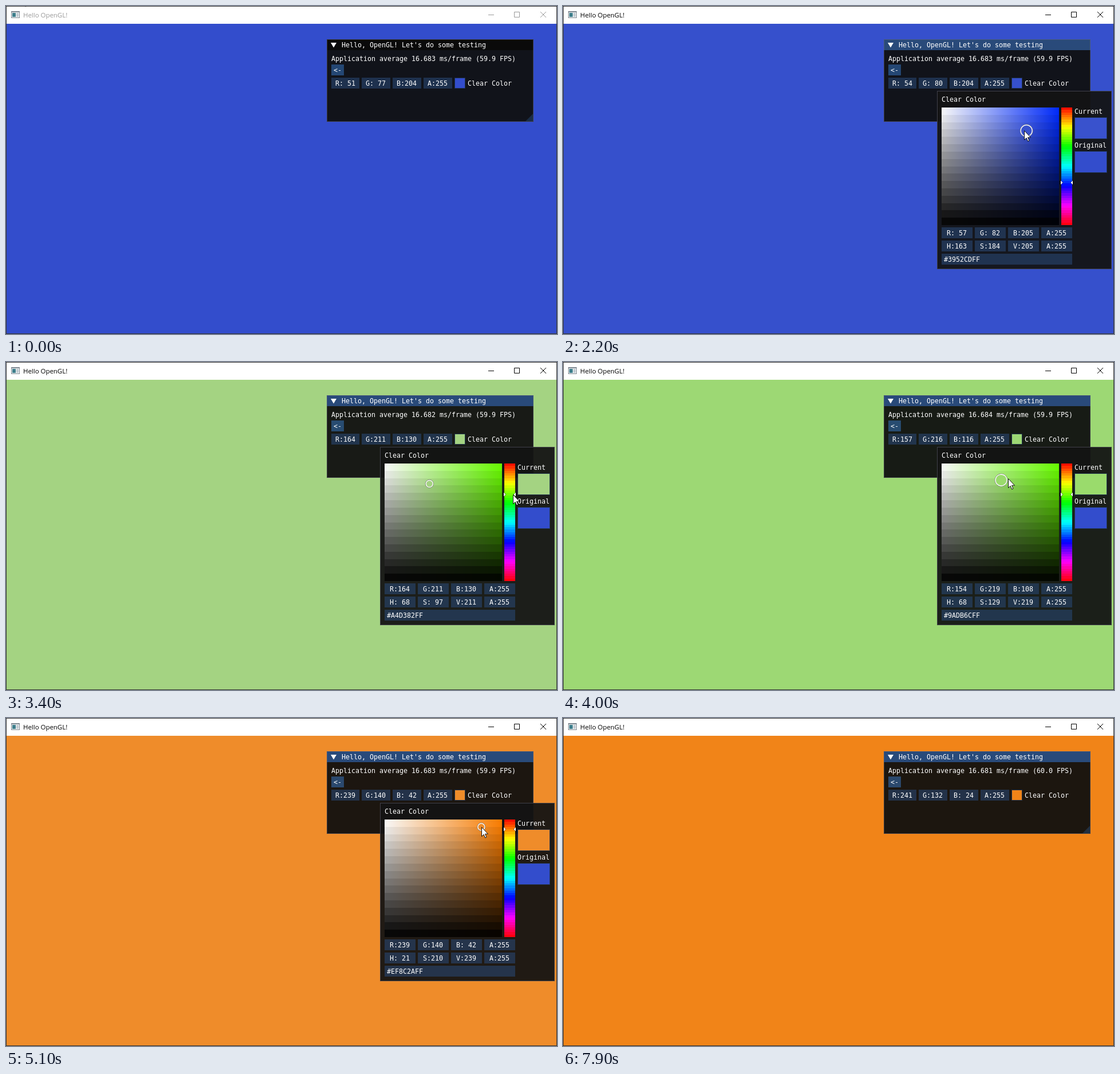
An HTML page for the animation above (8000 ms loop, 962x572 px).

```html
<!DOCTYPE html>
<html lang="en">
<head>
<meta charset="utf-8">
<title>Hello OpenGL!</title>
<style>
  html, body { margin: 0; width: 100%; height: 100%; overflow: hidden; background: #fff; }
  svg { display: block; width: 962px; height: 572px; }
  rect { shape-rendering: crispEdges; }
  text { white-space: pre; fill: #fff; font: 11.63px "DejaVu Sans Mono", "Liberation Mono", monospace; }
  #caption { font: 11.45px "Open Sans", "Noto Sans", sans-serif; }
  .field { fill: rgba(41, 74, 122, .54); }
  .edge { fill: none; stroke: rgba(110, 110, 128, .5); }
</style>
</head>
<body>
<svg id="stage" viewBox="0 0 962 572">
  <linearGradient id="sat">
    <stop offset="0" stop-color="#fff"/>
    <stop id="pure" offset="1"/>
  </linearGradient>

  <rect width="962" height="572" fill="#333"/>
  <rect x="1" y="1" width="960" height="30" fill="#fff"/>
  <g id="icon">
    <rect x="9" y="9" width="15" height="12" fill="#7d8790"/>
    <rect x="10" y="11" width="13" height="9" fill="#f4f6f7"/>
    <rect x="11" y="12" width="6" height="7" fill="#3f7f8c"/>
    <rect x="18" y="12" width="4" height="7" fill="#c3ccd2"/>
  </g>
  <text id="caption" x="30" y="20">Hello OpenGL!</text>
  <path id="controls" fill="none" d="M842 15.5h10M887.5 10.5h9v9h-9zM933 10l10 10M943 10l-10 10"/>
  <rect id="backdrop" x="1" y="31" width="960" height="540"/>

  <g id="panel">
    <rect x="560" y="58" width="361" height="144" fill="#0f0f0f" fill-opacity=".94"/>
    <rect id="bar" x="560" y="58" width="361" height="19"/>
    <path fill="rgba(66,150,250,.2)" d="M920 188v13h-13z"/>
    <rect class="edge" x="560.5" y="58.5" width="360" height="143"/>
    <path fill="#fff" d="M567 64h10l-5 8.5z"/>
    <text x="586" y="72">Hello, OpenGL! Let's do some testing</text>
    <text id="stats" x="568" y="96"></text>
    <rect x="568" y="102" width="22" height="19" fill="rgba(66,150,250,.4)"/>
    <text x="572" y="116">&lt;-</text>
    <text x="806" y="139">Clear Color</text>
  </g>

  <g id="popup">
    <rect x="653" y="148" width="305" height="311" fill="#141414" fill-opacity=".94"/>
    <rect class="edge" x="653.5" y="148.5" width="304" height="310"/>
    <text x="661" y="167">Clear Color</text>
    <rect x="661" y="177" width="205" height="205" fill="url(#sat)"/>
    <g id="shades"></g>
    <g id="hues"></g>
    <g id="pointers">
      <path d="M868 -4.5l5 4.5l-5 4.5zM891 -4.5l-5 4.5l5 4.5z"/>
      <path fill="#fff" d="M869 -3.5l3.5 3.5l-3.5 3.5zM890 -3.5l-3.5 3.5l3.5 3.5z"/>
    </g>
    <circle id="halo" fill="none" stroke="#808080"/>
    <circle id="ring" stroke="#fff" stroke-width="1.3"/>
    <text x="893" y="188">Current</text>
    <text x="893" y="247">Original</text>
    <rect class="field" x="661" y="432" width="228" height="19"/>
    <text id="hex" x="665" y="446"></text>
  </g>

  <path id="cursor" fill="#fff" stroke="#000" stroke-width=".9" d="M.5 .5v16l3.6-3.4 2.6 5.8 2.3-1-2.5-5.7h5z"/>
</svg>
<script>
const $ = id => document.getElementById(id);

function set(el, attrs) {
  for (const key in attrs) el.setAttribute(key, attrs[key]);
  return el;
}

function add(parent, tag, attrs) {
  return parent.appendChild(set(document.createElementNS("http://www.w3.org/2000/svg", tag), attrs));
}

function addSwatch(parent, x, y, width, height) {
  add(parent, "rect", { class: "field", x, y, width, height });
  return add(parent, "rect", { x: x + 1, y: y + 1, width: width - 2, height: height - 2 });
}

// Four value boxes that share a width; returns their text elements
function addFields(parent, x, y, total) {
  const size = (total - 12) / 4;
  return [0, 1, 2, 3].map(i => {
    const start = x + i * (size + 4), left = Math.floor(start);
    const width = Math.floor(start + size) - left;
    add(parent, "rect", { class: "field", x: left, y, width, height: 19 });
    return add(parent, "text", { x: left + Math.floor((width - 35) / 2), y: y + 14 });
  });
}

// Picker field: left, top and side length
const LEFT = 661, TOP = 177, SIDE = 205;

function addBands(parent, count, x, width, style) {
  const edge = i => TOP + Math.round(SIDE * i / count);
  for (let i = 0; i < count; i++)
    add(parent, "rect", { x, width, y: edge(i), height: edge(i + 1) - edge(i), ...style((i + .5) / count) });
}

addBands($("shades"), 16, LEFT, SIDE, u => ({ "fill-opacity": u }));
addBands($("hues"), 48, 870, 19, u => ({ fill: `hsl(${u * 360},100%,50%)` }));

const panelFields = addFields($("panel"), 568, 125, 211);
const rgbFields = addFields($("popup"), LEFT, 386, 228);
const hsvFields = addFields($("popup"), LEFT, 409, 228);
const panelSwatch = addSwatch($("panel"), 783, 125, 19, 19);
const currentSwatch = addSwatch($("popup"), 893, 194, 57, 38);
const originalSwatch = addSwatch($("popup"), 893, 253, 57, 38);

const clamp = x => Math.min(1, Math.max(0, x));
const spot = (s, v) => [LEFT + s * SIDE, TOP + (1 - v) * SIDE];
const hueSpot = h => [885, TOP + h * SIDE];

const first = { h: .6383, s: .75, v: .8 };
const pale = spot(.382, .8275), gold = spot(.8235, .937), orange = spot(.902, .945);
const entry = [27, -18];

// Pointer moves: start, end, destination, and what is dragged on the way
const moves = [
  [0, 500, [460, 245]],
  [500, 1100, [797, 136]],
  [1600, 1950, spot(first.s, first.v)],
  [2100, 2550, pale, "sv"],
  [2650, 3100, [880, 273]],
  [3150, 3350, hueSpot(.2648), "h"],
  [3400, 3850, pale],
  [3880, 4150, gold, "sv"],
  [4190, 4350, [885, 228]],
  [4350, 4680, hueSpot(.083), "h"],
  [4780, 5100, gold],
  [5150, 5520, orange, "sv"],
  [5600, 6100, [851, 119]],
  [6900, 7600, [40, -28]]
];

function pointer(t) {
  let p = entry;
  for (const [start, end, to] of moves) {
    const u = clamp((t - start) / (end - start)), e = u * u * (3 - 2 * u);
    p = p.map((from, i) => from + (to[i] - from) * e);
  }
  return p;
}

function picked(t) {
  const c = { ...first, radius: 6 };
  for (const [start, end, , kind] of moves) {
    if (!kind || t < start) continue;
    const [x, y] = pointer(Math.min(t, end)), down = clamp((y - TOP) / SIDE);
    if (kind === "h") c.h = down;
    else {
      c.s = clamp((x - LEFT) / SIDE);
      c.v = 1 - down;
      if (t < end) c.radius = 10;
      else c.radius = 6;
    }
  }
  return c;
}

function toRgb({ h, s, v }) {
  return [5, 3, 1].map(n => {
    const k = (n + h * 6) % 6;
    return Math.round(255 * v * (1 - s * clamp(Math.min(k, 4 - k))));
  });
}

const paint = (el, rgb) => set(el, { fill: `rgb(${rgb})` });

function fillFields(fields, names, values) {
  fields.forEach((el, i) => {
    el.textContent = names[i] + ":" + String(values[i]).padStart(3);
  });
}

function drawPopup(c) {
  const rgb = toRgb(c), [cx, cy] = spot(c.s, c.v);
  set($("pure"), { "stop-color": `rgb(${toRgb({ h: c.h, s: 1, v: 1 })})` });
  set($("pointers"), { transform: `translate(0 ${Math.round(hueSpot(c.h)[1])})` });
  set($("halo"), { cx, cy, r: c.radius + 1 });
  paint(set($("ring"), { cx, cy, r: c.radius }), rgb);
  paint(currentSwatch, rgb);
  fillFields(rgbFields, "RGBA", [...rgb, 255]);
  fillFields(hsvFields, "HSVA", [c.h, c.s, c.v, 1].map(x => Math.round(x * 255)));
  $("hex").textContent = "#" + [...rgb, 255]
    .map(x => x.toString(16).padStart(2, "0")).join("").toUpperCase();
}

function draw(t) {
  const active = t >= 1400, ink = active ? "#000" : "#999";
  $("caption").style.fill = ink;
  set($("controls"), { stroke: ink });
  set($("bar"), { fill: active ? "#294a7a" : "#0a0a0a" });

  // Last digit of the frame time, renewed every 800 ms
  const digit = "3237243321"[Math.floor(t / 800)];
  $("stats").textContent =
    `Application average 16.68${digit} ms/frame (${digit === "1" ? "60.0" : "59.9"} FPS)`;

  // The window trails the picker, which trails the pointer
  const shown = toRgb(picked(t - 46));
  paint($("backdrop"), shown);
  paint(panelSwatch, shown);
  fillFields(panelFields, "RGBA", [...shown, 255]);

  const open = t >= 1500 && t < 6600;
  $("popup").style.display = open ? "" : "none";
  if (open) drawPopup(picked(t - 25));

  const [x, y] = pointer(t).map(Math.round);
  set($("cursor"), { transform: `translate(${x} ${y})` });
}

paint(originalSwatch, toRgb(first));
const begin = performance.now();
function tick() {
  const t = (performance.now() - begin) % 8000;
  draw(Math.floor(t / 100) * 100);
  requestAnimationFrame(tick);
}
tick();
</script>
</body>
</html>
```
